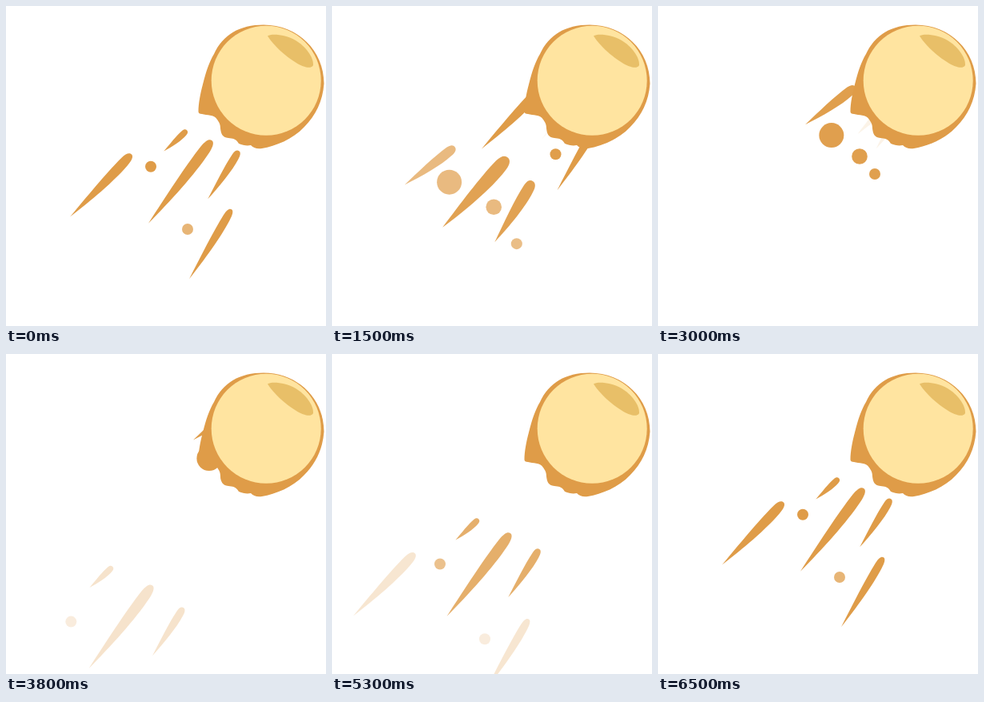
An HTML page that plays this animation: 400 by 400 pixels, repeating every 6.6 s.

```html
<!DOCTYPE html>
<html lang="en">
<head>
<meta charset="utf-8">
<title>Meteor</title>
<style>
  html, body { margin: 0; width: 100%; height: 100%; overflow: hidden; background: #fff; }
  svg { display: block; width: 100%; height: 100%; }
</style>
</head>
<body>
<svg viewBox="0 0 400 400">
  <g id="trail" fill="#df9c48"></g>
  <path fill="#df9c48" d="M240.5 132 C240.5 122 243 109 246 98 C250 82 254 70 260 60
    C271 36 292 23.5 322 23.5 C365 23.5 397.5 56 397.5 97 C396 119 387 137 373 151
    C358 167 337 175 320 178 C313 179 309 177 306 174 C301 175 296 174 291 172
    C287 165 283 166 278 165 C270 164 269 160 268 153 C268 147 266 145 264 142
    C260 135 251 137 245 135 C242 135 240.5 134 240.5 132Z"/>
  <circle cx="325.2" cy="93.3" r="68.5" fill="#ffe4a0"/>
  <path fill="#e8bf68" d="M327 37.5 C332 34 350 36 362 43 C374 50 385 64 384 74
    C382 79 372 77 362 70.5 C349 62.5 335 50 327 37.5Z"/>
</svg>
<script>
const FRAME = 100, FRAMES = 66, CYCLE = 64, HELD = 49;
const FADE_TIMES = [0, 16, 32, 48];

// Each wave: start step, times of the path points, and its parts.
// streak: [dx, dy, half width] from tip to head; dot: radius.
const waves = [
  { start: 32, times: [0, 32, 48], parts: [
    { streak: [29, -26, 3.8], fade: [0, .74, 1, 0], path: [[83, 317.5], [197.3, 181.5], [293, 77]] },
    { streak: [79.5, -103.5, 6.6], fade: [0, .74, 1, 0], path: [[86.5, 421], [178, 271.7], [268, 159.5]] },
    { streak: [39, -60, 4.8], fade: [0, .74, 1, 0], path: [[167, 408.5], [252.3, 241.3], [314, 127]] },
    { dot: 7, fade: [0, .5, 1, 0], path: [[58.3, 365.5], [181, 200.8], [283, 114]] }
  ] },
  { start: 48, times: FADE_TIMES, parts: [
    { streak: [77, -78, 6.1], fade: [0, 1, 1, .5], path: [[9, 348.5], [80, 263.6], [194, 173], [255, 120]] },
    { streak: [53, -87, 5], fade: [0, 1, 1, .5], path: [[181, 444.3], [229, 341.3], [285, 223], [312, 151]] },
    { dot: 7, fade: [0, .75, 1, 1], path: [[179, 382], [227, 279], [283, 179], [339, 79]] }
  ] },
  { start: 0, times: [0, 16, 42], parts: [
    { streak: [63, -47, 6], fade: [0, .74, 1, 1], path: [[5, 281], [96.5, 219.6], [259, 87]] },
    { streak: [82, -87, 8.5], fade: [0, 1, 0, 0], path: [[65, 348], [143, 272], [341, 64]] },
    { streak: [48, -76, 7], fade: [0, 1, 0, 0], path: [[134, 387], [208, 289], [328, 84]] },
    { dot: 15.5, fade: [0, .74, 1, 1], path: [[66, 282], [152, 216], [272.4, 115]] },
    { dot: 9.8, fade: [0, .74, 1, 1], path: [[138, 308], [206.5, 247.5], [291, 137]] },
    { dot: 7, fade: [0, .7, 1, 1], path: [[205.5, 369.7], [232.5, 292.3], [304, 139.5]] }
  ] }
];

const trail = document.getElementById('trail');

function addShape(tag, attrs) {
  const el = document.createElementNS('http://www.w3.org/2000/svg', tag);
  for (const name in attrs) el.setAttribute(name, attrs[name]);
  return trail.appendChild(el);
}

// Slim drop with its sharp tip at the origin and a blunt head at (dx, dy);
// the lower side bulges a little more than the upper one.
function streakPath([dx, dy, half]) {
  const len = Math.hypot(dx, dy);
  const at = (along, side) => {
    const s = side * half / len;
    return (dx * along - dy * s).toFixed(2) + ' ' + (dy * along + dx * s).toFixed(2);
  };
  return `M0 0C${at(.3, -.45)} ${at(.65, -1.05)} ${at(.89, -1)}
    C${at(.97, -.95)} ${at(1, -.6)} ${at(1, 0)}
    C${at(1, .6)} ${at(.95, .95)} ${at(.87, 1)}
    C${at(.65, 1.3)} ${at(.3, .75)} 0 0Z`;
}

function sample(times, values, t) {
  const last = times.length - 1;
  if (t >= times[last]) return values[last];
  let i = 0;
  while (t >= times[i + 1]) i++;
  const k = (t - times[i]) / (times[i + 1] - times[i]);
  return values[i] + (values[i + 1] - values[i]) * k;
}

for (const wave of waves) {
  for (const part of wave.parts) {
    part.el = part.dot ? addShape('circle', { r: part.dot })
                       : addShape('path', { d: streakPath(part.streak) });
    part.xs = part.path.map(p => p[0]);
    part.ys = part.path.map(p => p[1]);
  }
}

function draw(now) {
  const frame = Math.floor(now / FRAME) % FRAMES;
  const step = frame < HELD ? frame : frame - 1;
  for (const { start, times, parts } of waves) {
    const t = (step - start + CYCLE) % CYCLE;
    for (const { el, xs, ys, fade } of parts) {
      el.setAttribute('transform', `translate(${sample(times, xs, t)} ${sample(times, ys, t)})`);
      el.setAttribute('opacity', sample(FADE_TIMES, fade, t));
    }
  }
}

const begin = performance.now();
function tick() {
  draw(performance.now() - begin);
  requestAnimationFrame(tick);
}
tick();
</script>
</body>
</html>
```
